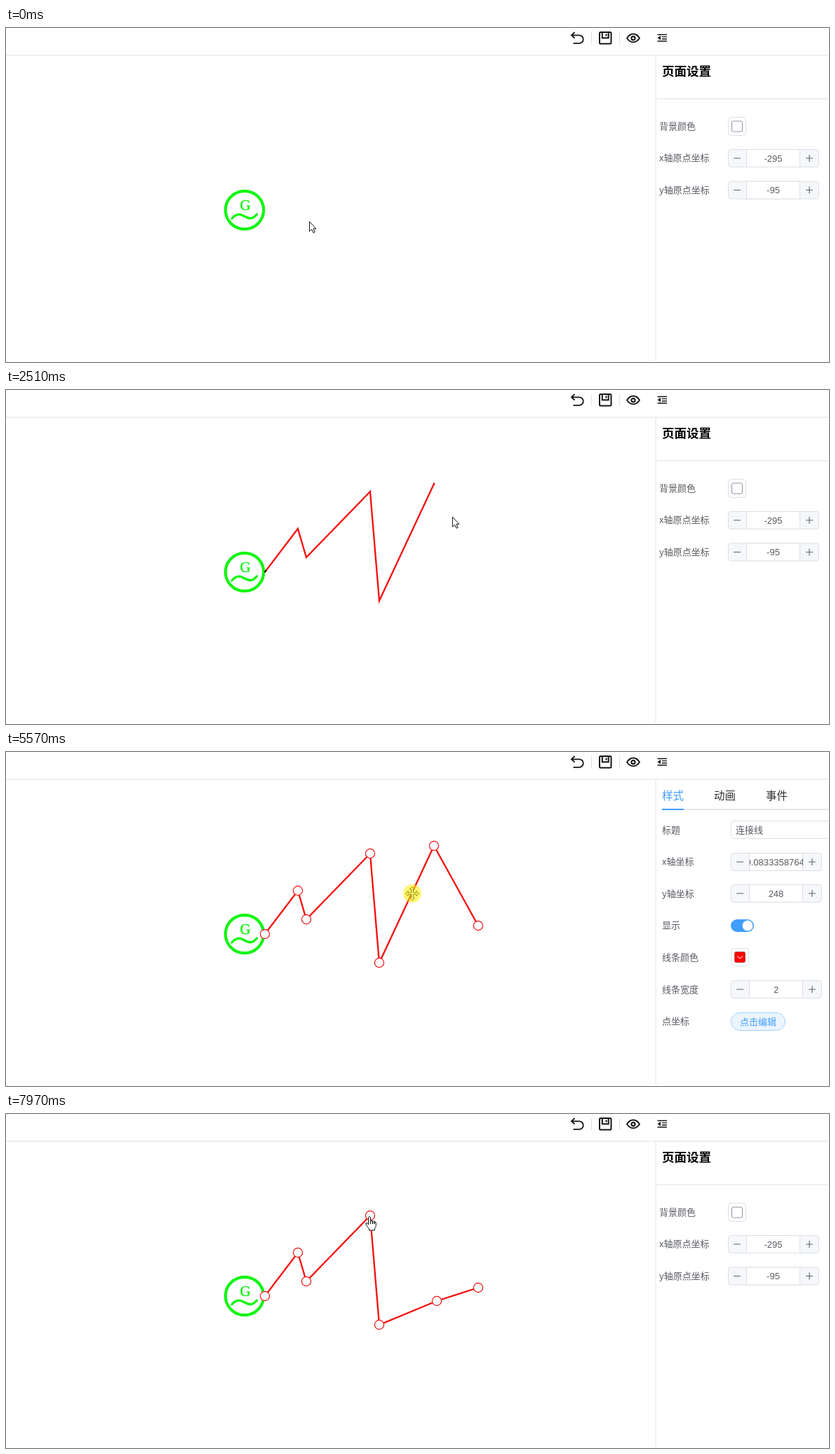
Animation, 1173 px wide and 477 px high, one loop 8 s. Source, as an HTML page:

```html
<!DOCTYPE html>
<html lang="zh-CN">
<head>
<meta charset="utf-8">
<title>连线编辑</title>
<style>
html, body { margin: 0; width: 100%; height: 100%; overflow: hidden; background: #fff; }
svg { display: block; width: 1173px; height: 477px; }
text { font: 13px "Noto Sans CJK SC", "Noto Sans CJK", sans-serif; fill: #585b61; }
.num { font-family: "Liberation Sans", sans-serif; text-anchor: middle; }
.head { font-size: 17.5px; font-weight: 700; fill: #000; }
.tab { font-size: 15.5px; fill: #303133; }
.on { fill: #409eff; }
.rule { fill: none; stroke: #e0e0e0; }
.box { fill: #fff; stroke: #dcdfe6; }
.side { fill: #f5f7fa; stroke: #dcdfe6; }
.icon { fill: none; stroke: #141414; stroke-width: 2; }
.sign { fill: none; stroke: #606266; stroke-width: 1.1; }
.green { fill: none; stroke: #12f512; }
.letter { font: 21px "Liberation Serif", serif; fill: #12f512; stroke: #12f512; stroke-width: .5; text-anchor: middle; }
.wire { fill: none; stroke: #f80c0c; stroke-width: 2.3; }
.stale { fill: none; stroke: #200808; stroke-width: 2; }
.knob { fill: #fff; stroke: #f01414; stroke-width: 1.2; }
.ptr { fill: #fff; stroke: #111; stroke-linejoin: round; }
</style>
</head>
<body>
<svg viewBox="0 0 1173 477">
  <defs><clipPath id="field"><rect x="1060" y="145" width="76" height="24"/></clipPath></defs>
  <path class="rule" d="M0 39H1173M926 39V475M834.5 6V23M874.5 6V23"/>
  <g class="icon">
    <path d="M810.5 6L806 10.3L810.5 14.5M806.5 10.3H817A5.8 5.8 0 0 1 817 21.9H808.5" stroke-width="1.8"/>
    <rect x="846" y="6" width="16.5" height="16.5" rx="1.5"/>
    <path d="M849.8 6V14.3H858.7V6M855.5 8.5V11.5"/>
    <path d="M885 14.5C890 6.5 898 6.5 903 14.5C898 22 890 22 885 14.5Z" stroke-width="1.8"/>
    <circle cx="894" cy="14.5" r="2.6"/>
    <path d="M928.5 9.5H942M935 12.6H942M935 15.7H942M928.5 18.8H942" stroke-width="1.4"/>
    <path d="M928.5 14.1L933 11V17.2Z" fill="#141414" stroke="none"/>
  </g>
  <g id="pagePanel"></g>
  <g id="linePanel"></g>

  <circle class="green" cx="340" cy="260" r="27.2" stroke-width="4.2"/>
  <path class="green" d="M322 272C328 265 333 265 340 269S352 273 357.5 266" stroke-width="3.4" stroke-linecap="round"/>
  <text class="letter" x="341.2" y="259.5">G</text>

  <path id="wire" class="wire"/>
  <path id="stub" class="stale" d="M368.5 260.5L371 257"/>
  <path id="smudge" class="stale" d="M574.5 211.5L584.5 189.5"/>
  <g id="anchors"></g>
  <g id="knobs"></g>
  <g id="pointer">
    <path id="arrow" class="ptr" d="M.5 .5V14.5L3.7 11.6L6 16.5L8.2 15.5L6 10.7H10Z"/>
    <path id="move" class="ptr" d="M0 -9.5L3.5 -6H1.3V-1.3H6V-3.5L9.5 0L6 3.5V1.3H1.3V6H3.5L0 9.5L-3.5 6H-1.3V1.3H-6V3.5L-9.5 0L-6 -3.5V-1.3H-1.3V-6H-3.5Z"/>
    <path id="hand" class="ptr" d="M-1.5 12V1.5Q0 -.8 1.5 1.5V11V6.5Q3 5.3 4.3 7V11V7Q5.8 5.8 7 8V11V8Q9.3 7 9.3 10V13.5Q9 16 7.5 17.5V20H-.5V18Q-2 16.5 -4.8 12Q-5.8 9.5 -4 9.5Q-2.8 9.8 -1.5 12Z"/>
  </g>
  <circle id="ring" r="13" fill="#fff000" fill-opacity=".55"/>
</svg>
<script>
const $ = id => document.getElementById(id);
const LOOP = 8000, LAG = 80;
const ROW = 45.6;

const label = (x, mid, s, cls = '') => `<text class="${cls}" x="${x}" y="${mid + 4.6}">${s}</text>`;
const rect = (x, y, w, h, r, attrs = 'class="box"') =>
  `<rect x="${x}" y="${y}" width="${w}" height="${h}" rx="${r}" ${attrs}/>`;
const labels = (x, mid, list) => list.map((s, i) => label(x, mid + ROW * i, s)).join('');
const knob = ([x, y], r) => `<circle class="knob" cx="${x}" cy="${y}" r="${r}"/>`;

function stepper(x, mid, value = '') {
  return rect(x + .5, mid - 12.5, 129, 25, 3.5, 'class="side"') +
    rect(x + 26.5, mid - 12.5, 76, 25, 0) +
    `<path class="sign" d="M${x + 8} ${mid}h10M${x + 111} ${mid}h10M${x + 116} ${mid - 5}v10"/>` +
    `<text class="num" x="${x + 64.5}" y="${mid + 4.7}">${value}</text>`;
}

$('pagePanel').innerHTML =
  '<text class="head" x="935" y="68">页面设置</text><path class="rule" d="M927 101H1173"/>' +
  labels(931, 140, ['背景颜色', 'x轴原点坐标', 'y轴原点坐标']) +
  rect(1029.5, 127.5, 25, 26, 4) + rect(1034.5, 133, 15, 15, 2, 'fill="#fff" stroke="#8c939d"') +
  stepper(1029, 186, '-295') + stepper(1029, 231.5, '-95');

$('linePanel').innerHTML =
  ['样式', '动画', '事件'].map((s, i) =>
    `<text class="tab ${i ? '' : 'on'}" x="${935 + 74 * i}" y="68">${s}</text>`).join('') +
  rect(935, 81, 238, 2, 0, 'fill="#e4e7ed"') + rect(935, 81, 31, 2, 0, 'class="on"') +
  labels(935, 111, ['标题', 'x轴坐标', 'y轴坐标', '显示', '线条颜色', '线条宽度', '点坐标']) +
  rect(1033.5, 98.5, 160, 25, 3.5) + label(1040, 111, '连接线') +
  stepper(1033, 157) +
  '<g clip-path="url(#field)"><text class="num" style="text-anchor:start" x="1054.5" y="161.5">0.08333587643</text></g>' +
  stepper(1033, 202, '248') +
  rect(1033, 239, 33, 18, 9, 'class="on"') + '<circle cx="1057" cy="248" r="7.5" fill="#fff"/>' +
  rect(1033.5, 280.5, 25, 25, 4) + rect(1038.5, 285.5, 15, 15, 2, 'fill="#f00" stroke="#a55"') +
  '<path d="M1042 291.5L1046 295L1050 291.5" fill="none" stroke="#fff"/>' +
  stepper(1033, 339, '2') +
  rect(1033.5, 372.5, 77, 25, 12.5, 'fill="#ecf5ff" stroke="#a0cfff"') + label(1046, 385, '点击编辑', 'on');

$('anchors').innerHTML = [0, 1, 2, 3].map(i => i * Math.PI / 2)
  .map(a => knob([340 + 29 * Math.cos(a), 260 + 29 * Math.sin(a)], 5)).join('');

// The wire is clicked out corner by corner at a steady beat.
const corners = [[369, 260], [416, 198], [428, 239], [519, 145], [532, 301], [610, 134], [673, 248]];
const BEAT = 285;
const beat = i => 952 + BEAT * i;
const DRAG = { from: 6600, to: 7350, corner: 5 };

// Pointer hops: start, end, destination
const hops = [
  [70, 620, corners[0]],
  ...corners.slice(1).map((p, i) => [beat(i), beat(i + 1), p]),
  [2860, 3270, [911, 80]],
  [3340, 3620, [973, 60]],
  [3620, 4160, [560, 196]],
  [4160, 4500, [583, 201]],
  [4770, 5030, [579, 202]],
  [5640, 6200, [611, 138]],
  [DRAG.from, DRAG.to, [615, 271]],
  [7420, 7900, [518, 146]]
];

const ease = u => u ** 3 / (u ** 3 + (1 - u) ** 3);
const within = (t, a, b) => t >= a && t < b;
const show = (id, on) => { $(id).style.display = on ? '' : 'none'; };

function pointerAt(t) {
  let x = 432, y = 276;
  for (const [from, to, [px, py]] of hops) {
    if (t < from) break;
    const e = ease(Math.min(1, (t - from) / (to - from)));
    x += (px - x) * e;
    y += (py - y) * e;
  }
  return [x, y];
}

// Placed corners plus a loose end that trails the pointer
function wireAt(t) {
  const late = t - LAG;
  const pts = corners.filter((_, i) => beat(i) <= late);
  if (pts.length && pts.length < corners.length) pts.push(pointerAt(late));
  if (t >= DRAG.from) {
    const [x, y] = pointerAt(Math.min(t, DRAG.to));
    pts[DRAG.corner] = [x - 1, y - 4];
  }
  return pts;
}

function shapeAt(t) {
  if (within(t, 500, 1160) || within(t, 5030, 5710)) return 'move';
  return within(t, 6060, 7490) || t >= 7830 ? 'hand' : 'arrow';
}

function draw(t) {
  const [x, y] = pointerAt(t), pts = wireAt(t), shape = shapeAt(t);
  $('pointer').setAttribute('transform', `translate(${x} ${y})`);
  for (const id of ['arrow', 'move', 'hand']) show(id, id === shape);

  $('wire').setAttribute('d', pts.length ? 'M' + pts.join('L') : '');
  $('wire').style.stroke = t < 1160 ? '#111' : '';
  show('stub', t >= beat(0));
  show('smudge', within(t, 5780, 6670));

  show('anchors', within(t, 500, beat(0)));
  const knobs = within(t, 5030, 7490) || t >= 7830;
  show('knobs', knobs);
  if (knobs) $('knobs').innerHTML = pts.map(p => knob(p, 6.6)).join('');

  const tapped = corners.some((_, i) => within(t, beat(i), beat(i) + 70));
  show('ring', tapped || within(t, 5500, 5710) || within(t, DRAG.from, DRAG.to));
  $('ring').setAttribute('cx', t >= DRAG.from ? x - 1 : x);
  $('ring').setAttribute('cy', y);

  const editing = within(t, 5500, DRAG.from);
  show('linePanel', editing);
  show('pagePanel', !editing);
}

const start = performance.now();
function tick() {
  draw((performance.now() - start) % LOOP);
  requestAnimationFrame(tick);
}
tick();
</script>
</body>
</html>
```
